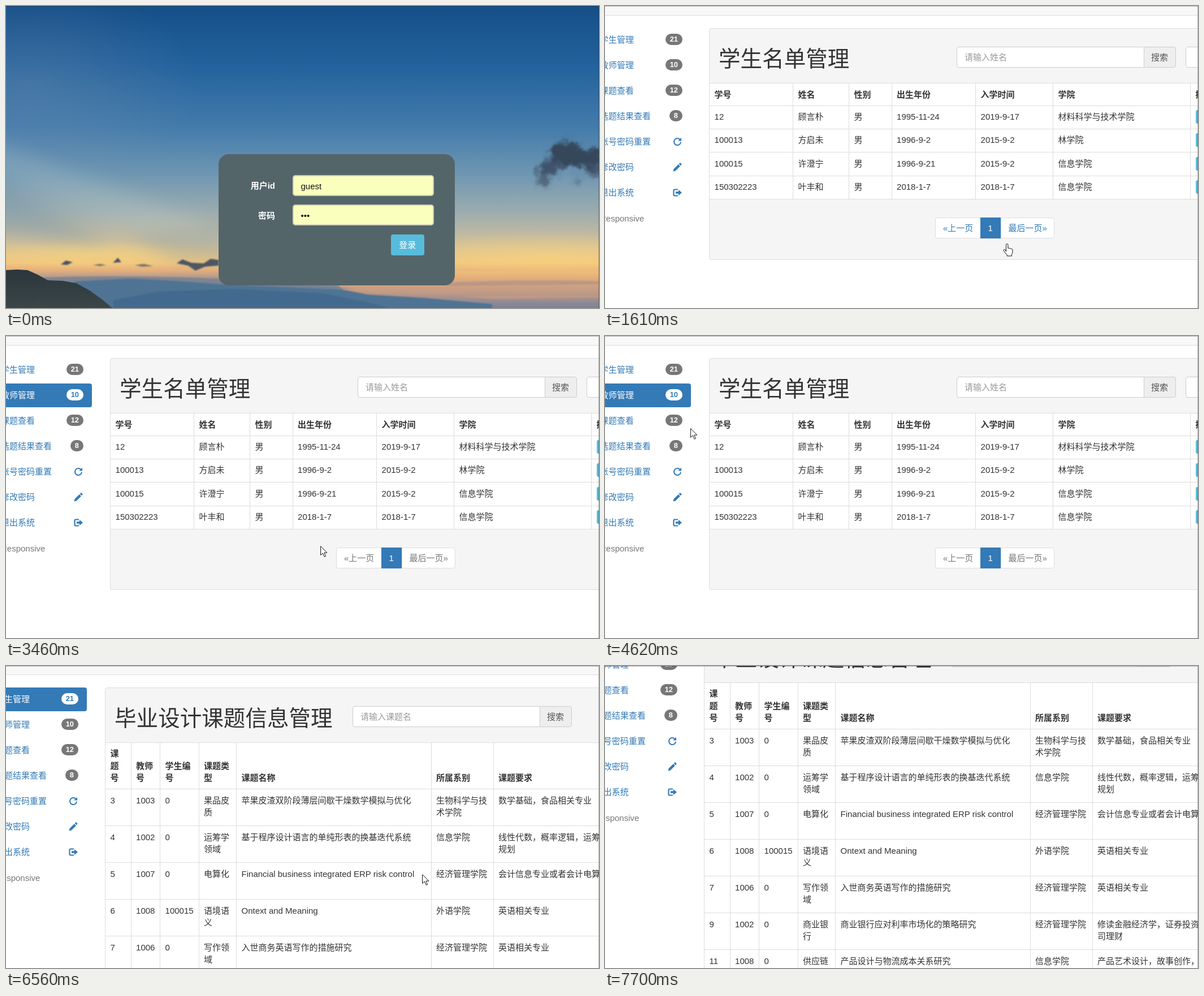
An HTML page that plays this animation: 1049x534 px, repeating every 8000 ms.

```html
<!DOCTYPE html>
<html lang="zh-CN">
<head>
<meta charset="utf-8">
<title>选题系统</title>
<style>
html, body { margin: 0; width: 100%; height: 100%; overflow: hidden; background: #fff; }
#stage {
  position: absolute; inset: 0; width: 1049px; height: 534px; overflow: hidden;
  font: 15px/21.43px "Liberation Sans", "Noto Sans CJK SC", "Noto Sans CJK", sans-serif; color: #333;
}
#stage div, #stage svg { position: absolute; box-sizing: border-box; }
#stage .scene { inset: 0; }
#stage .t { white-space: nowrap; }
.scene, .cursor, .cursor svg, .late, .hover, .btn { animation: 8s step-end infinite; }

/* login */
.login { animation-name: login; }
.box { left: 376px; top: 261.5px; width: 417.5px; height: 232.5px; border-radius: 18px; background: #546569; }
.label { right: 573px; color: #fff; font-weight: bold; }
.field {
  left: 507px; width: 250px; height: 37px; padding: 7px 12.5px; border: 2px solid #cfcdbb;
  border-radius: 5px; background: #faffbd; color: #111;
}
.btn {
  left: 681px; top: 404px; width: 58.5px; height: 36.5px; padding-top: 7.5px; border-radius: 4px;
  text-align: center; color: #fff; animation-name: press;
}

/* pages */
.list { animation-name: list; }
.topics { animation-name: topics; }
.page { left: 0; top: 0; width: 1200px; height: 800px; background: #fff; }
.topics .page { left: -9px; animation: scroll 8s step-end infinite; }
.nav { left: 0; top: 0; width: 100%; height: 17px; background: #f8f8f8; border-bottom: 1px solid #dcdcdc; }
.item { left: -25px; width: 176.5px; height: 42.5px; padding: 10.5px 16px; border-radius: 4px; color: #337ab7; white-space: nowrap; }
.item.on { background: #337ab7; color: #fff; }
.item svg { right: 15.5px; top: 13px; fill: currentColor; }
.badge {
  right: 15px; top: 10.5px; height: 20px; padding: 0 7.5px; border-radius: 10px;
  background: #777; color: #fff; font: bold 12.86px/20px "Liberation Sans", sans-serif;
}
.on .badge { background: #fff; color: #337ab7; }
.hover { left: -25px; width: 176.5px; height: 42.5px; border-radius: 4px; background: #eee; animation-name: hover; }
.late { animation-name: late; }
.panel { left: 184px; top: 39px; width: 1100px; background: #f5f5f5; border: 1px solid #ddd; border-radius: 4px; }
.title { font-size: 38.57px; font-weight: 300; line-height: 42px; }
.search { top: 72px; height: 36.5px; padding: 6.5px 13px; border: 1px solid #ccc; border-radius: 4px 0 0 4px; background: #fff; color: #999; }
.search.add { background: #eee; color: #555; padding: 6.5px 12px; border-radius: 0 4px 4px 0; }
.cell { padding: 8.57px; border: solid #ddd; border-width: 1px 0 0 1px; background: #fff; display: flex; }
.cell.head { align-items: flex-end; font-weight: bold; }
.op { left: 1044.6px; width: 50px; height: 24px; border-radius: 3px; background: #5bc0de; }
.pg { padding: 6.5px 13px; border: 1px solid #ddd; background: #fff; white-space: nowrap; animation: dim 8s step-end infinite; }
.pg.first { border-radius: 4px 0 0 4px; }
.pg.last { border-radius: 0 4px 4px 0; }
.pg.now { background: #337ab7; border-color: #337ab7; color: #fff; animation: none; }

.cursor { left: 0; top: 0; animation-name: move; }
.arrow { animation-name: arrow !important; }
.hand { animation-name: hand !important; }
.cursor path { fill: #fff; stroke: #111; stroke-linejoin: round; }
.edge { inset: 0; border: solid rgba(0,0,0,.28); border-width: 1px 1px 0 0; }

@keyframes login { 0% { opacity: 1 } 20.125%, 100% { opacity: 0 } }
@keyframes list { 0% { opacity: 0 } 20.125% { opacity: 1 } 67.5%, 100% { opacity: 0 } }
@keyframes topics { 0% { opacity: 0 } 67.5%, 100% { opacity: 1 } }
@keyframes late { 0% { opacity: 0 } 21.125%, 100% { opacity: 1 } }
@keyframes dim { 0% { color: #337ab7 } 21.125%, 100% { color: #777 } }
@keyframes hover { 0% { opacity: 0 } 58.7%, 100% { opacity: 1 } }
@keyframes scroll {
  0% { transform: none } 81.9% { transform: translateY(-1px) }
  82.875% { transform: translateY(-60px) } 83.875%, 100% { transform: translateY(-107px) }
}
@keyframes press {
  0% { background: #57bcdb; box-shadow: none }
  6.5% { background: #31b0d5; box-shadow: none }
  10.5% { background: #269abc; box-shadow: 0 0 0 1px #3d8ee0, inset 0 0 0 1px #3d8ee0 }
  11.25%, 100% { background: #31b0d5; box-shadow: 0 0 0 1px #3d8ee0, inset 0 0 0 1px #3d8ee0 }
}
@keyframes arrow {
  0% { opacity: 0 } .875% { opacity: 1 } 6.5% { opacity: 0 } 25% { opacity: 1 }
  58.7% { opacity: 0 } 74.2% { opacity: 1 } 96.25%, 100% { opacity: 0 }
}
@keyframes hand {
  0% { opacity: 0 } 6.5% { opacity: 1 } 25% { opacity: 0 } 58.7% { opacity: 1 } 74.2%, 100% { opacity: 0 }
}
@keyframes move {
  0% { transform: translate(978px, 535px) }
  .875% { transform: translate(978px, 535px); animation-timing-function: steps(4, start) }
  4.66% { transform: translate(810px, 455px); animation-timing-function: steps(4, start) }
  8.45% { transform: translate(706px, 420px) }
  15.25% { transform: translate(704px, 420px) }
  25% { transform: translate(704px, 420px); animation-timing-function: steps(5, start) }
  29.81% { transform: translate(560px, 360px); animation-timing-function: steps(6, start) }
  35.59% { transform: translate(393px, 313px) }
  35.625% { transform: translate(393px, 313px); animation-timing-function: steps(3, start) }
  38.475% { transform: translate(368px, 330px); animation-timing-function: steps(6, start) }
  44.175% { transform: translate(556px, 371px); animation-timing-function: steps(2, start) }
  46.075% { transform: translate(561px, 369px) }
  47.25% { transform: translate(561px, 369px); animation-timing-function: steps(3, start) }
  50.06% { transform: translate(577px, 365px) }
  52% { transform: translate(577px, 365px); animation-timing-function: steps(8, start) }
  59.67% { transform: translate(90px, 134px); animation-timing-function: steps(2, start) }
  61.58% { transform: translate(59px, 148px) }
  63.5% { transform: translate(59px, 148px); animation-timing-function: steps(2, start) }
  65.5% { transform: translate(57px, 148px) }
  73.25% { transform: translate(57px, 148px); animation-timing-function: steps(5, start) }
  78.06% { transform: translate(420px, 300px); animation-timing-function: steps(5, start) }
  82.875% { transform: translate(736px, 368px) }
  85.625% { transform: translate(736px, 368px); animation-timing-function: steps(8, start) }
  93.325% { transform: translate(915px, 60px); animation-timing-function: steps(3, start) }
  96.2125%, 100% { transform: translate(905px, 3px) }
}
</style>
</head>
<body>
<div id="stage">
  <div class="scene login">
    <svg width="1049" height="534">
      <defs>
        <linearGradient id="sky" x2="0" y2="1">
          <stop offset="0" stop-color="#154f88"/><stop offset=".2" stop-color="#23629d"/>
          <stop offset=".4" stop-color="#437bab"/><stop offset=".56" stop-color="#7097b2"/>
          <stop offset=".68" stop-color="#9bacaf"/><stop offset=".75" stop-color="#bcb8a3"/>
          <stop offset=".81" stop-color="#dcc493"/><stop offset=".85" stop-color="#f0c681"/>
          <stop offset=".875" stop-color="#e5b07c"/><stop offset=".905" stop-color="#a59592"/>
          <stop offset=".94" stop-color="#6f8498"/><stop offset="1" stop-color="#4c7396"/>
        </linearGradient>
        <linearGradient id="dusk" x2="0" y2="1">
          <stop offset="0" stop-color="#f0bf79"/><stop offset=".25" stop-color="#dca67c"/>
          <stop offset=".5" stop-color="#c09a86"/><stop offset=".75" stop-color="#8a8995"/>
          <stop offset="1" stop-color="#667d95"/>
        </linearGradient>
        <linearGradient id="hill" x2="0" y2="1">
          <stop offset="0" stop-color="#2b363d"/><stop offset="1" stop-color="#3b4647"/>
        </linearGradient>
        <radialGradient id="sun"><stop stop-color="#ffd878" stop-opacity=".5"/><stop offset="1" stop-color="#ffd878" stop-opacity="0"/></radialGradient>
        <radialGradient id="pale"><stop stop-color="#8f9bb0" stop-opacity=".25"/><stop offset="1" stop-color="#8f9bb0" stop-opacity="0"/></radialGradient>
        <filter id="soft" x="-20%" y="-50%" width="140%" height="200%"><feGaussianBlur stdDeviation="14"/></filter>
        <filter id="puff" x="-30%" y="-30%" width="160%" height="160%">
          <feGaussianBlur stdDeviation="4" result="blur"/>
          <feTurbulence type="fractalNoise" baseFrequency=".06" numOctaves="3" seed="4"/>
          <feDisplacementMap in="blur" scale="22" xChannelSelector="R" yChannelSelector="G"/>
        </filter>
        <filter id="wisp" x="-20%" y="-80%" width="140%" height="260%"><feGaussianBlur stdDeviation="1"/></filter>
      </defs>
      <rect width="1049" height="534" fill="url(#sky)"/>
      <ellipse cx="40" cy="140" rx="300" ry="180" fill="url(#pale)"/>
      <ellipse cx="960" cy="445" rx="330" ry="48" fill="url(#sun)"/>
      <ellipse cx="150" cy="440" rx="240" ry="26" fill="url(#sun)"/>
      <g filter="url(#soft)">
        <path d="M-30 235L400 400V425L180 385L-30 290Z" fill="#d5dcd6" opacity=".16"/>
        <path d="M-30 315L190 425L-30 400Z" fill="#6f8fa5" opacity=".3"/>
        <path d="M210 405L390 380V450H300Z" fill="#7f9aa5" opacity=".3"/>
      </g>
      <g filter="url(#wisp)">
        <path d="M560 468H1070V545H720L600 505Z" fill="url(#dusk)"/>
        <path d="M780 489Q920 482 1070 487V492L780 495Z" fill="#8a8893" opacity=".4"/>
        <path d="M40 481Q200 474 400 483L620 500L380 497L120 492Z" fill="#737f90" opacity=".75"/>
        <path d="M120 487L220 482L300 486L380 492L600 502L640 510L740 516L860 527V545H150Z" fill="#4f7393"/>
        <path d="M190 520L270 505L400 500L560 508L640 524L700 540H190Z" fill="#43698e"/>
        <path d="M800 513L940 511L1070 512V515L860 518Z" fill="#d29b82" opacity=".6"/>
      </g>
      <path d="M0 467L20 466L38 467L56 475L74 485L100 486L124 490L148 503L170 519L188 534H0Z" fill="url(#hill)"/>
      <g filter="url(#puff)" fill="#35465a">
        <ellipse cx="990" cy="259" rx="27" ry="21"/>
        <ellipse cx="1026" cy="270" rx="32" ry="17"/>
        <ellipse cx="964" cy="284" rx="23" ry="13" opacity=".8"/>
        <ellipse cx="950" cy="304" rx="13" ry="15" opacity=".6"/>
        <ellipse cx="1042" cy="290" rx="16" ry="12" opacity=".6"/>
        <ellipse cx="1010" cy="308" rx="9" ry="7" opacity=".35"/>
      </g>
      <g filter="url(#wisp)" fill="#4e5763">
        <path d="M302 455L312 448L328 454L350 455L362 447L376 449V459L352 461L335 468L322 459Z"/>
        <path d="M97 457L106 450L118 453L108 458Z"/>
        <path d="M189 454L198 445L204 453Z"/>
        <path d="M154 458L166 456L177 458L166 460ZM228 458L244 456L260 460L240 461Z" opacity=".7"/>
      </g>
    </svg>
    <div class="box"></div>
    <div class="t label" style="top:306.5px">用户id</div>
    <div class="t label" style="top:359.5px">密码</div>
    <div class="field" style="top:299px">guest</div>
    <div class="field" style="top:351px">•••</div>
    <div class="btn">登录</div>
  </div>
  <div class="scene list"></div>
  <div class="scene topics"></div>
  <div class="cursor">
    <svg class="arrow" width="14" height="21"><path d="M.6.8V16.4L4.4 13L7.2 19.4L9.6 18.4L6.9 12.2H12Z"/></svg>
    <svg class="hand" width="19" height="24"><path d="M5.5 14V2.3a1.7 1.7 0 0 1 3.4 0V8.3q1.4-1 2.8.5q1.5-.9 2.7.6q2.1-.6 2.6 1.3v4q0 2.3-1.6 4.6v2.7H7.2v-2q-2.5-2.3-5.8-7.2c-1.3-2.2 1.2-3.2 2.4-1.7z"/></svg>
  </div>
  <div class="edge"></div>
</div>
<script>
const box = (cls, x, y, w, h, body = '') =>
  `<div class="${cls}" style="left:${x}px;top:${y}px;width:${w}px;height:${h}px">${body}</div>`;
const text = (cls, x, y, body) => `<div class="t ${cls}" style="left:${x}px;top:${y}px">${body}</div>`;
const icon = d => `<svg width="16" height="16" viewBox="0 0 16 16">${d}</svg>`;

const menu = [
  ['学生管理', 21], ['教师管理', 10], ['课题查看', 12], ['选题结果查看', 8],
  ['账号密码重置', icon('<path d="M12.6 4.2A6 6 0 1 0 14 8.6" fill="none" stroke="currentColor" stroke-width="2"/><path d="M15 .8V6.6H9.2Z"/>')],
  ['修改密码', icon('<path d="M.5 15.5L1.6 11.3L9.8 3.1L12.9 6.2L4.7 14.4ZM10.7 2.2L12.3.6Q13 0 13.8.8L15.2 2.2Q16 3 15.3 3.7L13.8 5.3Z"/>')],
  ['退出系统', icon('<path d="M9 2.5H3.5Q1.5 2.5 1.5 4.5V11.5Q1.5 13.5 3.5 13.5H9" fill="none" stroke="currentColor" stroke-width="2.2"/><path d="M5 6.2H10V3L16 8L10 13V9.8H5Z"/>')]
];
const rowTop = i => 38.5 + 45 * i;
const item = (i, cls = '') => {
  const [name, extra] = menu[i];
  const tail = typeof extra === 'number' ? `<div class="badge">${extra}</div>` : extra;
  return `<div class="item ${cls}" style="top:${rowTop(i)}px">${name}${tail}</div>`;
};
const sidebar = '<div class="nav"></div>' + menu.map((_, i) => item(i)).join('') +
  '<div class="t" style="left:-9px;top:364.5px;color:#777">Responsive</div>';

const heading = (title, hint) =>
  text('title', 201, 73, title) + box('search', 622, 72, 332, 36.5, hint) +
  box('search add', 953, 72, 56.5, 36.5, '搜索');

const table = (xs, ys, rows) => rows.map((row, r) => row.split('|').map((cell, c) =>
  box(r ? 'cell' : 'cell head', xs[c], ys[r], xs[c + 1] - xs[c], ys[r + 1] - ys[r], `<span>${cell}</span>`)
).join('')).join('');

const students = [
  '学号|姓名|性别|出生年份|入学时间|学院|操作',
  '12|顾言朴|男|1995-11-24|2019-9-17|材料科学与技术学院|',
  '100013|方启未|男|1996-9-2|2015-9-2|林学院|',
  '100015|许澄宁|男|1996-9-21|2015-9-2|信息学院|',
  '150302223|叶丰和|男|2018-1-7|2018-1-7|信息学院|'
];
const studentY = [135.5, 175.5, 216.5, 258, 299.5, 341];

const topics = [
  '课题号|教师号|学生编号|课题类型|课题名称|所属系别|课题要求',
  '3|1003|0|果品皮质|苹果皮渣双阶段薄层间歇干燥数学模拟与优化|生物科学与技术学院|数学基础，食品相关专业',
  '4|1002|0|运筹学领域|基于程序设计语言的单纯形表的换基迭代系统|信息学院|线性代数，概率逻辑，运筹学规划',
  '5|1007|0|电算化|Financial business integrated ERP risk control|经济管理学院|会计信息专业或者会计电算化',
  '6|1008|100015|语境语义|Ontext and Meaning|外语学院|英语相关专业',
  '7|1006|0|写作领域|入世商务英语写作的措施研究|经济管理学院|英语相关专业',
  '9|1002|0|商业银行|商业银行应对利率市场化的策略研究|经济管理学院|修读金融经济学，证券投资公司理财',
  '11|1008|0|供应链|产品设计与物流成本关系研究|信息学院|产品艺术设计，故事创作，'
];
const topicY = [135.5, ...topics.map((_, i) => 218 + 65 * i)];

document.querySelector('.list').innerHTML = `<div class="page">
  <div class="hover" style="top:${rowTop(2)}px"></div>${sidebar}${item(1, 'on late')}
  <div class="panel" style="height:410px"></div>
  ${heading('学生名单管理', '请输入姓名')}${box('search', 1027, 72, 90, 36.5)}
  ${table([184, 332, 431, 506.5, 655, 792, 1035, 1200], studentY, students)}
  ${studentY.slice(1, 5).map(y => `<div class="op" style="top:${y + 8.5}px"></div>`).join('')}
  ${box('', 184, 341, 900, 1, '<div style="inset:0;background:#ddd"></div>')}
  ${box('pg first', 584, 374, 80.5, 36.5, '«上一页')}${box('pg last', 699.5, 374, 95, 36.5, '最后一页»')}
  ${box('pg now', 663.5, 374, 36.5, 36.5, '1')}</div>`;

document.querySelector('.topics').innerHTML = `<div class="page">
  ${sidebar}${item(0, 'on')}
  <div class="panel" style="height:740px"></div>
  ${heading('毕业设计课题信息管理', '请输入课题名')}
  ${table([184, 229.5, 281, 349.5, 416, 760.5, 870.5, 1090], topicY, topics)}</div>`;
</script>
</body>
</html>
```
